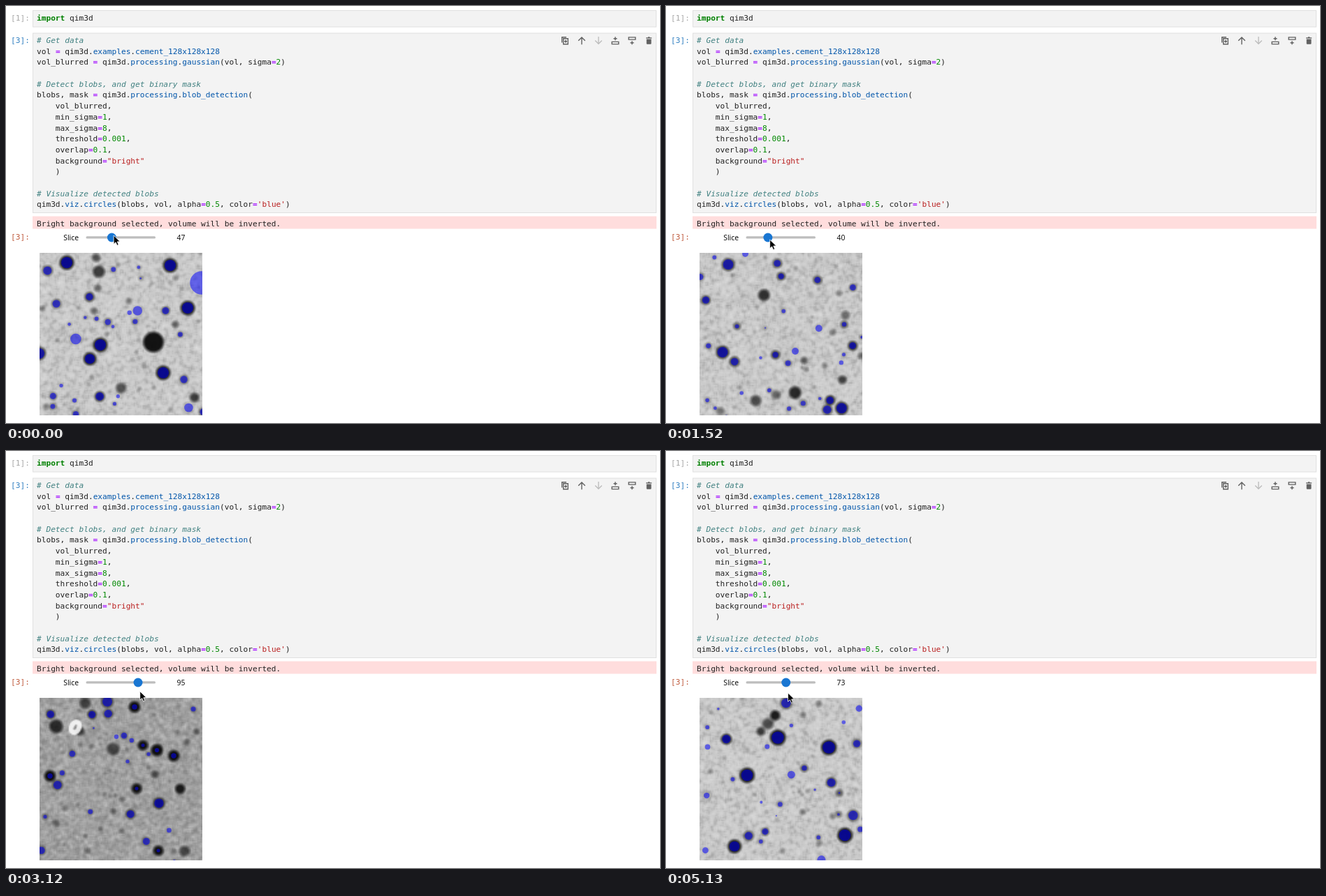
These frames come from a looping animation (936x598 px, 5.21 s). An HTML page with a canvas:

```html
<!DOCTYPE html>
<html lang="en">
<head>
<meta charset="utf-8">
<title>Blob detection notebook</title>
<style>
  html, body { margin: 0; width: 100%; height: 100%; overflow: hidden; background: #fff; }
  canvas { position: absolute; left: 48px; top: 354px; }
  svg { position: absolute; left: 0; top: 0; }
  text { white-space: pre; font: 11.16px "DejaVu Sans Mono", monospace; fill: #212121; }
  .ui { font: 10.3px "Noto Sans", sans-serif; fill: #111; }
  .comment { fill: #408080; font-style: italic; }
  .string { fill: #ba2121; }
  .keyword { fill: #008000; font-weight: bold; }
  .operator { fill: #aa22ff; font-weight: bold; }
  .property { fill: #0055aa; }
  .number { fill: #008800; }
  .cell { fill: #f3f3f3; stroke: #e0e0e0; }
  .icon { fill: none; stroke: #616161; stroke-width: 1.4; }
</style>
</head>
<body>
<canvas id="view" width="233" height="233"></canvas>
<svg width="936" height="598" viewBox="0 0 936 598">
  <rect class="cell" x="38.5" y="6.5" width="892" height="23.5"/>
  <rect class="cell" x="38.5" y="39" width="892" height="257.5"/>
  <rect x="38" y="301.5" width="893" height="18" fill="#ffdddd"/>
  <text x="7" y="21" style="fill:#a8a8a8">[1]:</text>
  <text x="7" y="53" style="fill:#307fc1">[3]:</text>
  <text x="7" y="335" style="fill:#bf5b3d">[3]:</text>
  <g id="code"></g>
  <text x="44" y="316">Bright background selected, volume will be inverted.</text>

  <g class="icon">
    <path d="M797.7 46.7h6.6v8h-6.6z M795.7 52.5v-7.8h6.3 M801 48.7v4 M799 50.7h4"/>
    <path d="M824 55.2V45 M819.2 49.8L824 45l4.8 4.8"/>
    <path d="M848 44v10.2 M843.2 49.4l4.8 4.8 4.8-4.8" stroke="#bdbdbd"/>
    <path d="M867.2 51.4h9.6v3.2h-9.6z M872 44.2v5 M869.5 46.7h5"/>
    <path d="M891.2 44.9h9.6v3.2h-9.6z M896 50.3v5 M893.5 52.8h5"/>
  </g>
  <path fill="#616161" d="M916 45.2h2.4l.8-.9h1.8l.8.9h2.4v1.4H916z M916.7 47.4h6.8v6.4q0 1-1 1h-4.8q-1 0-1-1z"/>

  <text class="ui" x="104" y="335.5" text-anchor="end">Slice</text>
  <rect x="114.5" y="330.2" width="99.5" height="3.4" rx="1.5" fill="#bdbdbd"/>
  <circle id="knob" cy="332" r="6.5" fill="#1976d2"/>
  <text class="ui" id="readout" x="250.5" y="335.5" text-anchor="middle"></text>
  <path id="cursor" d="M0 0V12.4L2.9 9.8 4.9 14.3 7 13.4 5.1 9 9 8.8Z" stroke="#fff" stroke-width=".8"/>
</svg>
<script>
const $ = id => document.getElementById(id);

// ---- code cells
const source = `# Get data
vol = qim3d.examples.cement_128x128x128
vol_blurred = qim3d.processing.gaussian(vol, sigma=2)

# Detect blobs, and get binary mask
blobs, mask = qim3d.processing.blob_detection(
    vol_blurred,
    min_sigma=1,
    max_sigma=8,
    threshold=0.001,
    overlap=0.1,
    background="bright"
    )

# Visualize detected blobs
qim3d.viz.circles(blobs, vol, alpha=0.5, color='blue')`.split('\n');
const token = /(?<comment>#.*)|(?<string>"[^"]*"|'[^']*')|(?<keyword>\bimport\b)|(?<operator>=)|(?<property>(?<=\.)[a-z]\w*)|(?<number>\b\d[\d.]*)/g;

function highlight(line) {
  return line.replace(token, (...args) => {
    const kind = Object.entries(args.at(-1)).find(e => e[1])[0];
    return `<tspan class="${kind}">${args[0]}</tspan>`;
  });
}
const row = (line, y) => `<text x="44" y="${Math.round(y)}">${highlight(line)}</text>`;
$('code').innerHTML = row('import qim3d', 21) +
  source.map((line, i) => row(line, 53 + i * 15.69)).join('');

// ---- timeline: time, slice, pointer height
const LOOP = 5210, STEP = 80, LAG = 100;
const path = [
  [0, 47, 329], [960, 21, 332], [1120, 21, 332], [1760, 51, 337], [1920, 53, 338],
  [2640, 86, 342], [3520, 102, 347], [4010, 102, 347], [4410, 90, 347], [5130, 73, 347]
];
const moves = [[80, 560], [720, 960], [1200, 2880], [3040, 3200], [3360, 3520], [3680, 3680], [4090, 5130]];

function snap(t) {
  let last = 0;
  for (const [a, b] of moves)
    if (t >= a) last = Math.min(b, a + Math.floor((t - a) / STEP) * STEP);
  return last;
}
function at(t) {
  const i = Math.max(1, path.findIndex(p => p[0] >= t));
  const a = path[i - 1], b = path[i], f = (t - a[0]) / (b[0] - a[0]);
  return a.map((v, k) => v + (b[k] - v) * f);
}

// ---- volume of spherical pores
const VOXEL = 233 / 128;
let seed = 4217;
const rnd = (a = 0, b = 1) => {
  seed = (seed * 1664525 + 1013904223) % 4294967296;
  return a + (b - a) * seed / 4294967296;
};

// the largest pores: x, y, depth, radius
const pores = [
  [87, 368, 45, 11], [235, 372, 45, 11], [260, 433, 45, 11], [135, 486, 45, 11], [120, 506, 45, 10], [225, 526, 45, 11],
  [222, 435, 21, 10.5], [202, 469, 21, 10.5], [145, 500, 21, 11], [268, 524, 21, 10.5], [117, 484, 21, 9.5],
  [211, 482, 58, 25], [98, 384, 54, 11], [151, 540, 54, 12], [243, 540, 54, 11], [198, 566, 54, 11.5],
  [160, 411, 78, 12.5], [116, 465, 78, 12], [256, 551, 78, 12], [98, 567, 78, 11],
  [187, 495, 83, 10], [216, 429, 87, 14], [233, 425, 74, 11.5],
  [184, 367, 98, 12.5], [187, 484, 98, 12], [63, 466, 98, 12.5], [240, 437, 98, 12.5], [196, 422, 98, 12], [218, 573, 98, 12]
].map(([x, y, z, r]) => ({ x, y, z, r, dark: 1, found: true }));
pores.push({ x: 280, y: 397, z: 53, r: 25, dark: 0, found: true });

const clash = (p, q) => Math.hypot(p.x - q.x, p.y - q.y, (p.z - q.z) * VOXEL) < p.r + q.r - 1;
for (let i = 0; i < 2000; i++) {
  const p = { x: rnd(46, 283), y: rnd(352, 589), z: rnd(10, 112), r: 2.5 + 7.5 * rnd() ** 2.2 };
  p.found = p.r > 3.2 && rnd() < .75;
  p.dark = p.found && rnd() < .15 ? .15 : rnd(.6, 1);
  if (!pores.some(q => clash(p, q))) pores.push(p);
}

// ---- image
const make = size => Object.assign(document.createElement('canvas'), { width: size, height: size }).getContext('2d');
const view = $('view').getContext('2d'), vox = make(128), grain = make(256);

function makeGrain() {
  const n = 256, raw = Array.from({ length: n * n }, () => rnd(-1, 1));
  const img = grain.createImageData(n, n);
  for (let i = 0; i < n * n; i++) {
    let sum = 0;
    for (const dy of [-n, 0, n])
      for (const dx of [-1, 0, 1]) sum += raw[(i + dx + dy + n * n) % (n * n)];
    const v = sum / 9, c = v > 0 ? 255 : 0;
    img.data.set([c, c, c, Math.abs(v) * (v > 0 ? 130 : 75)], i * 4);
  }
  grain.putImageData(img, 0, 0);
}
makeGrain();

function smudge(x, y, r, alpha) {
  const g = vox.createRadialGradient(x, y, Math.max(0, r - 3), x, y, r + 2);
  [1, .55, 0].forEach((k, i) => g.addColorStop(i / 2, `rgba(5,5,5,${alpha * k})`));
  vox.fillStyle = g;
  vox.fillRect(x - r - 2, y - r - 2, 2 * r + 4, 2 * r + 4);
}
function grit(alpha) {
  vox.strokeStyle = `rgba(250,250,250,${alpha})`;
  vox.lineWidth = 7;
  vox.beginPath();
  vox.ellipse(99, 396, 5.5, 8, .45, 0, 7);
  vox.stroke();
}

// radius of a ball's cross-section at a distance from its centre
const cut = (r, d) => Math.sqrt(Math.max(0, r * r - d * d));

function drawSlice(depth) {
  const n = Math.round(depth), s = 1 / VOXEL, gritty = depth > 88;
  vox.setTransform(1, 0, 0, 1, 0, 0);
  vox.fillStyle = gritty ? '#a0a0a0' : '#c9c9c9';
  vox.fillRect(0, 0, 128, 128);
  vox.drawImage(grain.canvas, -(n * 37 % 128), -(n * 59 % 128));
  vox.setTransform(s, 0, 0, s, -48 * s, -354 * s);
  for (const p of pores) {
    const r = cut(p.r, (p.z - depth) * VOXEL);
    if (r > 1) smudge(p.x, p.y, r, Math.min(.93, .12 * r) * p.dark);
  }
  if (gritty) grit(.9);

  view.drawImage(vox.canvas, 0, 0, 233, 233);
  view.save();
  view.translate(-48, -354);
  view.fillStyle = 'rgba(0,0,255,.52)';
  for (const p of pores) {
    const r = p.found ? cut(p.r * .8, (p.z - depth) * VOXEL) : 0;
    if (r < 1) continue;
    view.beginPath();
    view.arc(p.x, p.y, r, 0, 7);
    view.fill();
  }
  view.restore();
}

let drawn = -1;
function frame() {
  const t = snap((performance.now() - start) % LOOP);
  if (t !== drawn) {
    drawn = t;
    const [, value, y] = at(t), slice = Math.round(value), x = 114.5 + .784 * slice;
    $('readout').textContent = slice;
    $('knob').setAttribute('cx', x);
    $('cursor').setAttribute('transform', `translate(${x + 2.8} ${y})`);
    drawSlice(at(Math.max(0, t - LAG))[1]);
  }
  requestAnimationFrame(frame);
}
const start = performance.now();
frame();
</script>
</body>
</html>
```
